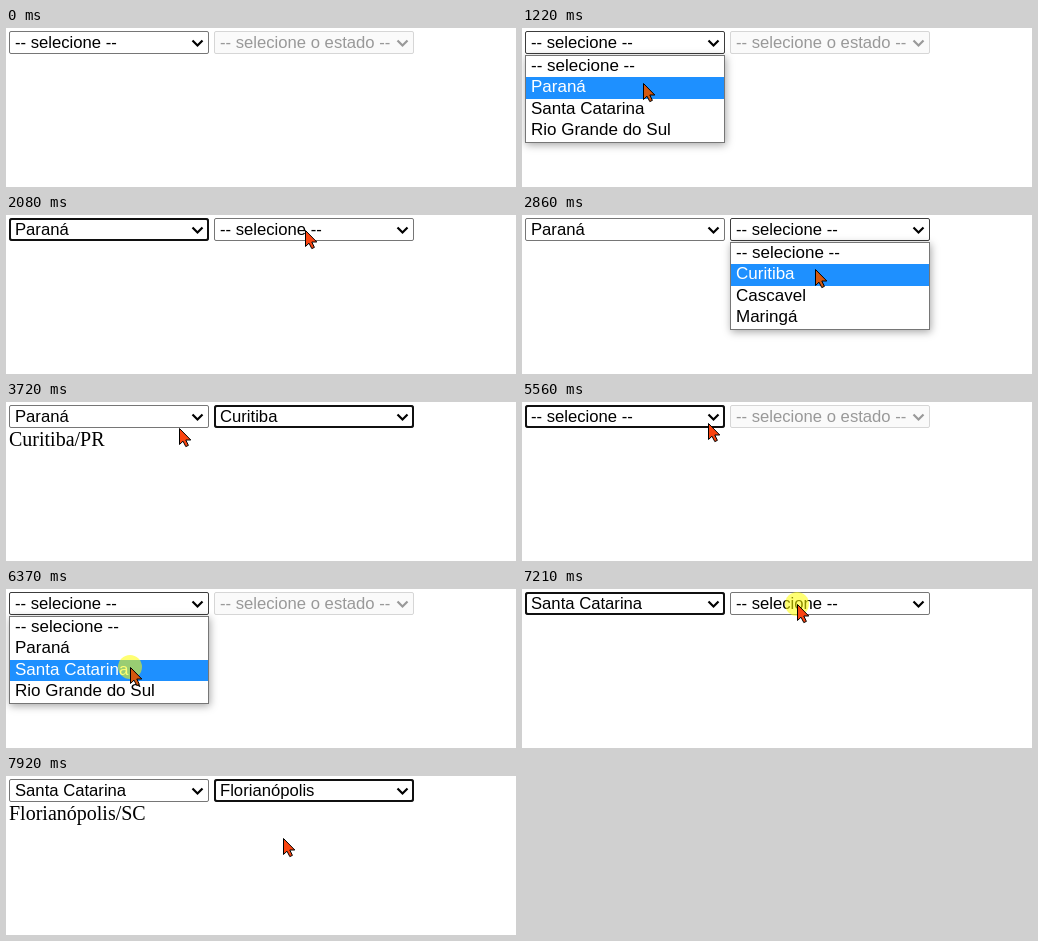
An HTML page for the animation above (7990 ms loop, 510 by 159 pixels).

```html
<!DOCTYPE html>
<html lang="pt-BR">
<head>
<meta charset="utf-8">
<title>Estado e cidade</title>
<style>
  html, body { margin: 0; width: 100%; height: 100%; overflow: hidden; background: #fff; }
  #stage { position: relative; width: 510px; height: 159px; overflow: hidden; background: #fff; }
  #stage * { box-sizing: border-box; }
  .select, .list { position: absolute; width: 200px; font: 16.67px "Liberation Sans", Arial, sans-serif; color: #000; white-space: pre; }
  .select { top: 3px; height: 23px; border: 1px solid #767676; border-radius: 2px; background: #fff; }
  .select span { position: absolute; left: 5px; top: 0; line-height: 21px; }
  .select svg { position: absolute; left: 180.5px; top: 6.5px; fill: none; stroke: currentColor; stroke-width: 2.2; }
  .select.open { border-color: #3c3c3c; }
  .select.focus::after { content: ""; position: absolute; inset: -1px; border: 2px solid #101010; border-radius: 3px; }
  .select.off { color: #999; border-color: #d6d6d6; background: #fafafa; }
  .list { top: 27px; height: 88px; font-size: 17px; border: 1px solid #767676; background: #fff; box-shadow: 1px 2px 8px rgba(0, 0, 0, .35); }
  .list div { height: 21.33px; padding-left: 5px; line-height: 19px; }
  .list .hot { background: #1e90ff; color: #fff; }
  #result { position: absolute; left: 3px; top: 25px; font: 20px/24px "Liberation Serif", Times, serif; color: #000; }
  #pointer { position: absolute; left: 0; top: 0; overflow: visible; }
</style>
</head>
<body>
<div id="stage">
  <div id="result"></div>
  <svg id="pointer" width="1" height="1">
    <circle id="halo" r="12" fill="#ff0" fill-opacity=".55"/>
    <path id="arrow" d="M.5 .5V16.5L4 13.2L6.8 18.6L9.4 17.4L6.8 12H11.8Z" stroke="#000"/>
  </svg>
</div>
<script>
const LOOP = 7990, ENTER = 70, LAG = 80;
const LIST_TOP = 28, ROW = 21.33, PRESS_Y = 15;
const MENU_X = [3, 208];
const NONE = "-- selecione --";
const states = [NONE, "Paraná", "Santa Catarina", "Rio Grande do Sul"];
const cities = {
  1: [NONE, "Curitiba", "Cascavel", "Maringá"],
  2: [NONE, "Florianópolis", "Blumenau", "Chapecó"]
};
const codes = { 1: "PR", 2: "SC" };

// Each choice presses a menu at x = from, then picks an item at x = to
const choices = [
  { menu: 0, item: 1, press: 620, pick: 1370, from: 150, to: 120 },
  { menu: 1, item: 1, press: 2180, pick: 3060, from: 300, to: 293 },
  { menu: 0, item: 0, press: 4160, pick: 4930, from: 132, to: 124 },
  { menu: 0, item: 2, press: 5790, pick: 6380, from: 166, to: 124 },
  { menu: 1, item: 1, press: 7200, pick: 7740, from: 275, to: 277 }
];
const point = (t, x, y) => ({ t, x, y });
const visits = [point(ENTER, 389, 74), point(5240, 388, 17), point(5560, 186, 21), point(LOOP, 277, 63)];
const clicks = choices.flatMap(c => [
  point(c.press, c.from, PRESS_Y),
  point(c.pick, c.to, LIST_TOP + 7 + ROW * c.item)
]);
const path = [...visits, ...clicks].sort((a, b) => a.t - b.t);

const stage = document.getElementById("stage");
const result = document.getElementById("result");
const pointer = document.getElementById("pointer");
const halo = document.getElementById("halo");
const arrow = document.getElementById("arrow");

function add(className, html) {
  const el = document.createElement("div");
  el.className = className;
  el.innerHTML = html;
  stage.insertBefore(el, pointer);
  return el;
}

const chevron = '<span></span><svg width="13" height="9"><path d="M1.5 1.5L6.5 6.5L11.5 1.5"/></svg>';
const selects = MENU_X.map(x => {
  const el = add("select", chevron);
  el.style.left = x + "px";
  return el;
});
const list = add("list", "<div></div>".repeat(states.length));

const ease = u => u < 0.5 ? 4 * u ** 3 : 1 - 4 * (1 - u) ** 3;

function pointerAt(t) {
  const i = Math.max(1, path.findIndex(p => p.t > t));
  const a = path[i - 1], b = path[i];
  const k = ease((t - a.t) / (b.t - a.t));
  return [a.x + (b.x - a.x) * k, a.y + (b.y - a.y) * k];
}

function formAt(t) {
  const form = { picked: [0, 0], focus: -1, open: -1 };
  for (const { menu, item, press, pick } of choices) {
    if (t >= press + LAG) form.focus = form.open = menu;
    if (t >= pick + LAG) {
      form.open = -1;
      form.picked[menu] = item;
      if (menu === 0) form.picked[1] = 0;
    }
  }
  return form;
}

function draw(t) {
  const { picked, focus, open } = formAt(t);
  const [state, city] = picked;
  const names = cities[state];
  const labels = [states[state], names ? names[city] : "-- selecione o estado --"];
  const visible = t >= ENTER;
  const [x, y] = visible ? pointerAt(t) : [0, 0];

  selects.forEach((el, i) => {
    el.firstChild.textContent = labels[i];
    el.classList.toggle("open", open === i);
    el.classList.toggle("focus", focus === i && open < 0);
    el.classList.toggle("off", i === 1 && !names);
  });
  result.textContent = city ? names[city] + "/" + codes[state] : "";

  list.style.display = open < 0 ? "none" : "block";
  if (open >= 0) {
    const items = [states, names][open];
    const hot = y < LIST_TOP ? picked[open] : Math.floor((y - LIST_TOP) / ROW);
    list.style.left = MENU_X[open] + "px";
    [...list.children].forEach((row, i) => {
      row.textContent = items[i];
      row.className = i === hot ? "hot" : "";
    });
  }

  pointer.style.display = visible ? "block" : "none";
  pointer.style.transform = `translate(${Math.round(x)}px, ${Math.round(y)}px)`;
  arrow.setAttribute("fill", open >= 0 && y > LIST_TOP ? "#d4570f" : "#fb4410");
  halo.style.display = clicks.some(c => t >= c.t - 40 && t < c.t + 120) ? "" : "none";
}

const start = performance.now();
function tick() {
  draw((performance.now() - start) % LOOP);
  requestAnimationFrame(tick);
}
tick();
</script>
</body>
</html>
```
